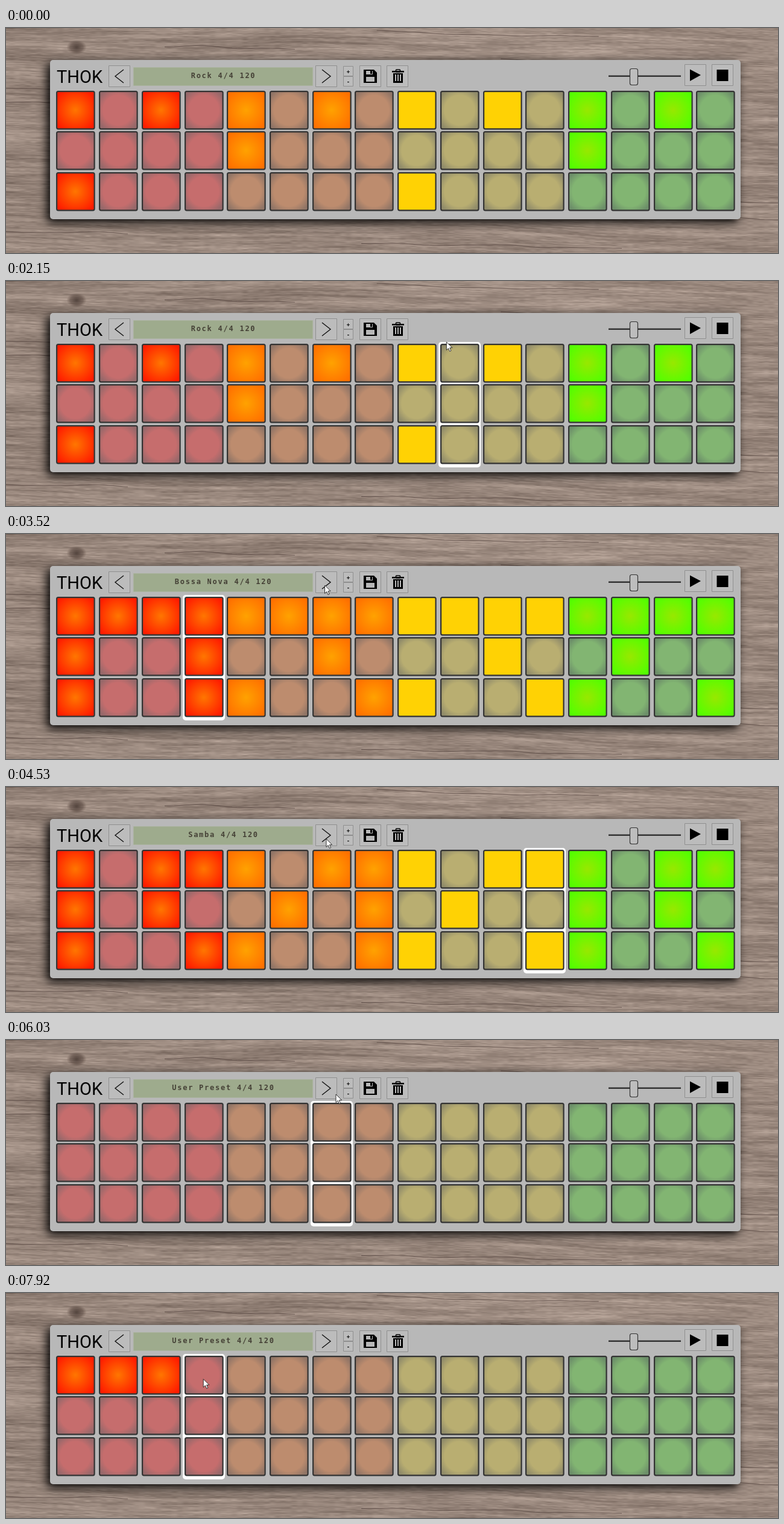
Recreate the animation shown at these times as an HTML page with a canvas. Size 1280 px wide and 373 px high, loop 8 s.

```html
<!DOCTYPE html>
<html lang="en">
<head>
<meta charset="utf-8">
<title>Drum machine</title>
<style>
html, body { margin: 0; width: 100%; height: 100%; overflow: hidden; background: #968479; }
canvas { display: block; width: 1280px; height: 373px; }
</style>
</head>
<body>
<canvas id="stage" width="1280" height="373"></canvas>
<script>
const W = 1280, H = 373, LOOP = 8000;
const ctx = document.getElementById('stage').getContext('2d');
const PANEL = '#b8b8b8', INK = '#333';

const PRESETS = [
  { at: 0, name: 'Rock', rows: ['x.x.x.x.x.x.x.x.', '....x.......x...', 'x.......x.......'] },
  { at: 2650, name: 'Bossa Nova', rows: ['xxxxxxxxxxxxxxxx', 'x..x..x...x..x..', 'x..xx..xx..xx..x'] },
  { at: 3620, name: 'Samba', rows: ['x.xxx.xxx.xxx.xx', 'x.x..x.x.x..x.x.', 'x..xx..xx..xx..x'] },
  { at: 4800, name: 'Disco', rows: ['x.x.x.x.x.x.x.x.', '....x.......x...', 'x...x...x...x...'] },
  { at: 5650, name: 'User Preset', rows: ['', '', ''] }
];
// per colour group: idle centre, idle edge, lit centre, lit edge
const TINTS = [
  ['#c66d6d', '#96686a', '#ff7600', '#ff1c00'],
  ['#bd8c6e', '#917566', '#ffa200', '#ff7000'],
  ['#b9ae71', '#918c6a', '#ffd204', '#ffd204'],
  ['#82b572', '#6c8e69', '#98e800', '#52ff00']
];
// pointer stops: time, x, y
const PATH = [
  [70, 1237, 373], [640, 1148, 89], [930, 1148, 89], [1400, 982, 122], [1750, 982, 122], [2500, 526, 84],
  [4530, 531, 86], [5800, 531, 84], [6030, 547, 90], [7080, 126, 133], [7210, 126, 133], [8000, 333, 143]
];
const START = 820;
const tapTime = col => 7210 + 265 * col;
const CLICKS = [START, tapTime(0), tapTime(1), tapTime(2), ...PRESETS.slice(1).map(p => p.at)];

const smooth = u => u * u * (3 - 2 * u);
const mix = (a, b, u) => a + (b - a) * u;
const clamp = u => Math.min(1, Math.max(0, u));

function pointerAt(t) {
  const i = PATH.findIndex(k => k[0] > t);
  const [t0, x0, y0] = PATH[i - 1], [t1, x1, y1] = PATH[i];
  const u = smooth((t - t0) / (t1 - t0));
  return [mix(x0, x1, u), mix(y0, y1, u)];
}

// steady beat with a short lag late in the loop
function stepAt(t) {
  const lag = 110 * clamp((t - 6050) / 800);
  return Math.floor((t - lag - 850) / 136);
}

function box(g, x, y, w, h, r, fill, stroke, line = 1) {
  g.beginPath();
  g.roundRect(x, y, w, h, r);
  if (fill) { g.fillStyle = fill; g.fill(); }
  if (stroke) { g.strokeStyle = stroke; g.lineWidth = line; g.stroke(); }
}

function poly(g, pts, fill, stroke, line) {
  g.beginPath();
  pts.forEach(([x, y]) => g.lineTo(x, y));
  if (fill) { g.fillStyle = fill; g.fill(); }
  if (stroke) { g.strokeStyle = stroke; g.lineWidth = line; g.stroke(); }
}

function hash(i, j) {
  const s = Math.sin(i * 127.1 + j * 311.7) * 43758.5453;
  return s - Math.floor(s);
}
function noise(x, y) {
  const i = Math.floor(x), j = Math.floor(y), u = smooth(x - i), v = smooth(y - j);
  return mix(mix(hash(i, j), hash(i + 1, j), u), mix(hash(i, j + 1), hash(i + 1, j + 1), u), v);
}

function drawWood(g) {
  const img = g.createImageData(W, H), d = img.data;
  for (let y = 0, p = 0; y < H; y++) {
    for (let x = 0; x < W; x++, p += 4) {
      const s = y - x * 0.02 + 14 * noise(x / 260, y / 70);
      const v = 0.3 * noise(x / 120, s / 5) + 0.3 * noise(x / 45, s / 1.8)
        + 0.25 * noise(x / 9, s) + 0.2 * noise(x / 420, s / 28);
      d[p] = mix(106, 196, v);
      d[p + 1] = mix(90, 177, v);
      d[p + 2] = mix(81, 165, v);
      d[p + 3] = 255;
    }
  }
  g.putImageData(img, 0, 0);

  g.strokeStyle = 'rgba(60,45,40,.5)';
  g.lineWidth = 1.2;
  for (let i = 0; i < 16; i++) {
    const x0 = hash(i, 3) * W - 150, y0 = i * H / 16 + 4, len = 150 + 350 * hash(i, 5);
    g.beginPath();
    for (let x = 0; x < len; x += 8) g.lineTo(x0 + x, y0 + x * 0.02 + 5 * noise(x / 60, i));
    g.stroke();
  }

  g.save();
  g.translate(117, 32);
  g.scale(1.4, 1);
  const knot = g.createRadialGradient(0, 0, 1, 0, 0, 12);
  knot.addColorStop(0, 'rgba(62,48,42,.75)');
  knot.addColorStop(0.6, 'rgba(72,56,49,.5)');
  knot.addColorStop(1, 'rgba(80,62,54,0)');
  g.fillStyle = knot;
  g.fillRect(-12, -12, 24, 24);
  g.restore();
}

function button(g, x, y, size) {
  box(g, x + 0.5, y + 0.5, size - 1, size - 1, 0, '#bcbcbc', '#8f8f8f');
}

function drawFloppy(g) {
  poly(g, [[593, 69], [610, 69], [615, 74], [615, 91], [593, 91]], '#000');
  g.fillStyle = PANEL;
  g.fillRect(597, 71, 11, 6);
  g.fillRect(597, 81, 14, 8);
  g.fillStyle = '#000';
  g.fillRect(604, 71, 3, 5);
}

function drawBin(g) {
  g.fillStyle = '#000';
  g.fillRect(640, 71, 20, 2.5);
  box(g, 646.5, 69, 7, 4, 1, null, '#000', 1.6);
  poly(g, [[642, 75], [658, 75], [658, 91], [642, 91]], '#000');
  g.fillStyle = PANEL;
  for (let x = 645; x < 656; x += 4) g.fillRect(x, 77, 2, 11);
}

function drawPanel(g) {
  g.save();
  g.shadowColor = '#000';
  g.shadowBlur = 16;
  g.shadowOffsetX = -5;
  g.shadowOffsetY = 5;
  box(g, 73, 53, 1145, 264, 5, PANEL);
  g.restore();

  g.fillStyle = '#000';
  g.font = '29px Roboto, sans-serif';
  g.fillText('THOK', 84, 91);

  button(g, 170, 62, 36);
  button(g, 513, 62, 36);
  poly(g, [[195, 69], [181, 80], [195, 91]], null, '#111', 1.4);
  poly(g, [[524, 69], [538, 80], [524, 91]], null, '#111', 1.4);
  box(g, 211.5, 65.5, 297, 30, 0, '#9eab8d', '#a9b29c');

  button(g, 559, 63, 17);
  button(g, 559, 80, 17);
  g.fillStyle = '#111';
  g.font = 'bold 9px "DejaVu Sans Mono", monospace';
  g.textAlign = 'center';
  g.fillText('+', 567.5, 74.5);
  g.fillText('-', 567.5, 92);

  button(g, 586, 62, 36);
  drawFloppy(g);
  button(g, 631, 62, 36);
  drawBin(g);

  g.fillStyle = INK;
  g.fillRect(999, 78.5, 120, 2.5);
  box(g, 1034.5, 67.5, 13, 27, 3, '#bdbdbd', INK, 1.2);
  button(g, 1125, 60, 36);
  poly(g, [[1134, 68.5], [1152, 78], [1134, 88]], '#000');
  button(g, 1170, 60, 36);
  g.fillStyle = '#000';
  g.fillRect(1178.5, 69, 19, 19);
}

const padX = col => Math.round(83.35 + col * 70.73);

function drawPad(col, row, lit) {
  const x = padX(col), y = Math.floor(104 + row * 67.5);
  const tint = TINTS[col >> 2];
  const fill = ctx.createRadialGradient(x + 32, y + 32, 0, x + 32, y + 32, 38);
  fill.addColorStop(0, tint[lit ? 2 : 0]);
  if (!lit) fill.addColorStop(0.65, tint[0]);
  fill.addColorStop(1, tint[lit ? 3 : 1]);
  box(ctx, x + 1.1, y + 1.1, 62.5, 62.2, 2.5, fill, INK, 2.2);
}

function drawPointer(x, y) {
  const shape = [[0, 0], [0, 13.5], [3.2, 10.6], [5.4, 15.6], [7.6, 14.6], [5.4, 9.8], [9.6, 9.6], [0, 0]];
  poly(ctx, shape.map(([a, b]) => [x + a, y + b]), '#fff', '#222', 0.9);
}

const back = document.createElement('canvas');
back.width = W;
back.height = H;
const bg = back.getContext('2d');
drawWood(bg);
drawPanel(bg);

function draw(t) {
  ctx.drawImage(back, 0, 0);
  const preset = PRESETS.findLast(p => p.at <= t);

  ctx.font = 'bold 12px "DejaVu Sans Mono", monospace';
  ctx.letterSpacing = '1.75px';
  ctx.textAlign = 'center';
  ctx.fillStyle = '#454136';
  ctx.fillText(preset.name + ' 4/4 120', 360.5, 83);

  // a new preset clears the marker until the next step
  const step = stepAt(t);
  if (step > 0 && step !== stepAt(preset.at)) {
    box(ctx, padX(step % 16) - 3, 101, 70, 208, 5, '#fff');
  }
  for (let row = 0; row < 3; row++) {
    for (let col = 0; col < 16; col++) {
      const tapped = row === 0 && t >= tapTime(col);
      drawPad(col, row, tapped || preset.rows[row][col] === 'x');
    }
  }

  if (t < PATH[0][0]) return;
  const [x, y] = pointerAt(t);
  drawPointer(x, y);
  if (CLICKS.some(c => t >= c - 90 && t < c)) {
    ctx.fillStyle = 'rgba(235,200,30,.75)';
    ctx.beginPath();
    ctx.arc(x, y, 11, 0, 7);
    ctx.fill();
  }
}

const start = performance.now();
function tick() {
  draw((performance.now() - start) % LOOP);
  requestAnimationFrame(tick);
}
tick();
</script>
</body>
</html>
```
